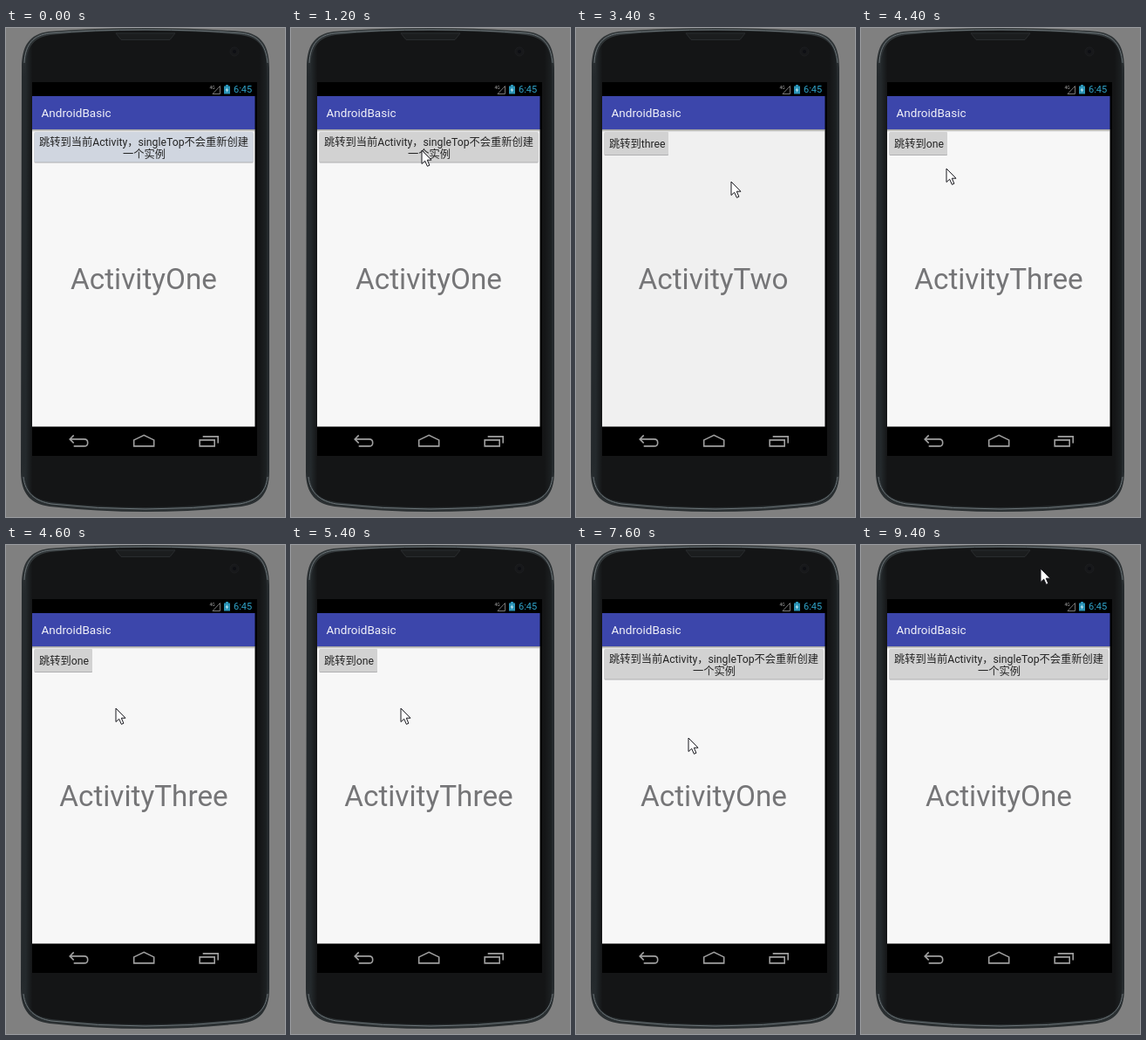
Animation, 320 px wide and 560 px high, one loop 9.8 s. Source, as an HTML page:

```html
<!DOCTYPE html>
<html lang="zh">
<head>
<meta charset="utf-8">
<title>Activity launch modes</title>
<style>
  html, body { margin: 0; width: 100%; height: 100%; overflow: hidden; background: #808080; }
  svg { display: block; width: 320px; height: 560px; }
  text { font-family: Roboto, "Noto Sans CJK SC", "Noto Sans CJK", sans-serif; }
  .title { font-size: 13.5px; fill: #f0f0f8; }
  .clock { font-size: 11px; fill: #2fa3c9; }
  .net { font-size: 5px; fill: #aaa; }
  .label { font-size: 12.25px; fill: #242424; }
  .name { font-size: 33.3px; fill: #757577; }
  .mid { text-anchor: middle; }
  .btn { fill: #d2d2d2; }
  .first .btn { fill: #d0d6e0; }
  .scene { visibility: hidden; }
  .scene.on { visibility: visible; }
  .nav { fill: none; stroke: #a0a0a0; stroke-width: 1.6; }
</style>
</head>
<body>
<svg id="stage" viewBox="0 0 320 560">
  <defs>
    <linearGradient id="rim" x2="0" y2="1">
      <stop offset="0" stop-color="#33383a"/>
      <stop offset=".1" stop-color="#24292c"/>
      <stop offset=".9" stop-color="#24292c"/>
      <stop offset="1" stop-color="#2c3133"/>
    </linearGradient>
    <linearGradient id="glass" x2="1" y2="0">
      <stop offset="0" stop-color="#252b2e"/>
      <stop offset=".03" stop-color="#141516"/>
      <stop offset=".97" stop-color="#141516"/>
      <stop offset="1" stop-color="#1d2123"/>
    </linearGradient>
    <linearGradient id="shade" x2="0" y2="1">
      <stop offset="0" stop-opacity=".4"/>
      <stop offset="1" stop-opacity="0"/>
    </linearGradient>
  </defs>

  <path fill="url(#rim)" d="M18 46C18 20 27 7 49 4Q100 0 160 0T271 4C293 7 302 20 302 46V508C302 534 291 545 270 548Q215 554 160 554T50 548C29 545 17 534 17 508Z"/>
  <path fill="url(#glass)" d="M23 46C23 22 31 11 51 8Q100 3 160 3T269 8C290 11 299 22 299 46V509C299 531 288 540 268 543Q215 549 160 549T52 543C32 540 22 531 22 509Z"/>
  <path fill="none" stroke="#6b7478" d="M21 40C22 18 32 8 50 6Q100 2 160 2T270 6C288 8 298 18 300 40M20 514C22 533 34 542 52 545Q105 551 160 551T268 545C286 542 298 533 300 514"/>
  <path d="M126 6H194L188 13.500H132Z" fill="#1b1d1e" stroke="#292c2e"/>
  <circle cx="262" cy="27" r="5" fill="#17181a" stroke="#1c1d20"/>
  <circle cx="262" cy="27" r="2" fill="#0e0f13"/>

  <rect x="30" y="62" width="258" height="428"/>
  <text class="net" x="233.500" y="70">4G</text>
  <path d="M237 75.500H245.500V66.500Z" fill="none" stroke="#777"/>
  <path d="M250 66.500H252V65H255V66.500H257V75.500H250Z" fill="#2a94b7"/>
  <path d="M253.800 68L251.700 71.500H253.200L252.800 74L255.200 70.500H253.600Z" fill="#c9eaf3"/>
  <text class="clock" x="261" y="74">6:45</text>

  <rect id="page" x="30" y="116" width="255.500" height="340.500" fill="#f7f7f7"/>
  <rect x="30" y="78" width="255.500" height="38" fill="#3c46ab"/>
  <rect x="30" y="116" width="255.500" height="3" fill="url(#shade)"/>
  <text class="title" x="40.500" y="102">AndroidBasic</text>

  <g class="scene" data-width="251">
    <text class="label mid" x="158" y="134.500">跳转到当前Activity，singleTop不会重新创建</text>
    <text class="label mid" x="158.500" y="148.500">一个实例</text>
    <text class="name mid" x="158" y="299">ActivityOne</text>
  </g>
  <g class="scene" data-width="73.500">
    <text class="label" x="38" y="136.500">跳转到three</text>
    <text class="name mid" x="157.500" y="299">ActivityTwo</text>
  </g>
  <g class="scene" data-width="66.500">
    <text class="label" x="38" y="136.500">跳转到one</text>
    <text class="name mid" x="158" y="299">ActivityThree</text>
  </g>

  <g class="nav" transform="translate(-.3 -.6)">
    <path d="M78 467L73.500 471.500L78 476M74 471.500H90Q94 471.500 94 475.500T90 479.500H78"/>
    <path d="M147 479.500V472.500L158.500 467L170 472.500V479.500Z"/>
    <path d="M222.500 472.500H239.500V479.500H222.500ZM226 468.500H243.500V476"/>
  </g>

  <path id="cursor" d="M0 0V15.500L3.700 12.200L6.400 18.300L8.900 17.200L6.300 11.200H11Z" fill="#fff" stroke="#16161c"/>
</svg>
<script>
  const LOOP = 9800, STEP = 200, LAST = 9400;
  const ONE = 0, TWO = 1, THREE = 2;
  // [start time, activity]
  const cuts = [[0, ONE], [3200, TWO], [4200, THREE], [7000, ONE]];
  // [time, x, y]
  const path = [
    [200, 206, 60], [1200, 150, 140], [2800, 150, 140], [3400, 178, 176],
    [4000, 70, 135], [4200, 70, 135], [4600, 126, 187], [5400, 126, 187],
    [6200, 65, 135], [6800, 65, 135], [7600, 129, 221], [8400, 129, 221],
    [LAST, 206, 27]
  ];
  const stage = document.getElementById('stage');
  const page = document.getElementById('page');
  const cursor = document.getElementById('cursor');
  const scenes = [...document.querySelectorAll('.scene')];

  function addRect(parent, x, y, width, height, attrs) {
    const rect = document.createElementNS(stage.namespaceURI, 'rect');
    for (const [key, value] of Object.entries({ x, y, width, height, ...attrs }))
      rect.setAttribute(key, value);
    parent.prepend(rect);
  }

  scenes.forEach((scene, i) => {
    const width = +scene.dataset.width, height = i === ONE ? 34.5 : 26;
    addRect(scene, 32.5, 119, width, height, { class: 'btn', rx: 1 });
    addRect(scene, 32.5, 120, width, height, { fill: '#b0b0b2', rx: 1 });
  });

  function cursorAt(t) {
    const next = path.findIndex(p => p[0] >= t);
    if (next <= 0) return path[0].slice(1);
    const [t0, x0, y0] = path[next - 1], [t1, x1, y1] = path[next];
    const k = (t - t0) / (t1 - t0), e = k * k * (3 - 2 * k);
    return [x0 + (x1 - x0) * e, y0 + (y1 - y0) * e];
  }

  function draw(t) {
    const active = cuts.filter(c => c[0] <= t).pop()[1];
    scenes.forEach((scene, i) => scene.classList.toggle('on', i === active));
    page.setAttribute('fill', active === TWO ? '#f0f0f0' : '#f7f7f7');
    stage.classList.toggle('first', t < STEP);
    cursor.setAttribute('visibility', t < STEP ? 'hidden' : 'visible');
    const [x, y] = cursorAt(t).map(Math.round);
    cursor.setAttribute('transform', `translate(${x} ${y})`);
  }

  const start = performance.now();
  function tick() {
    const t = (performance.now() - start) % LOOP;
    draw(Math.min(LAST, Math.floor(t / STEP) * STEP));
    requestAnimationFrame(tick);
  }
  tick();
</script>
</body>
</html>
```
